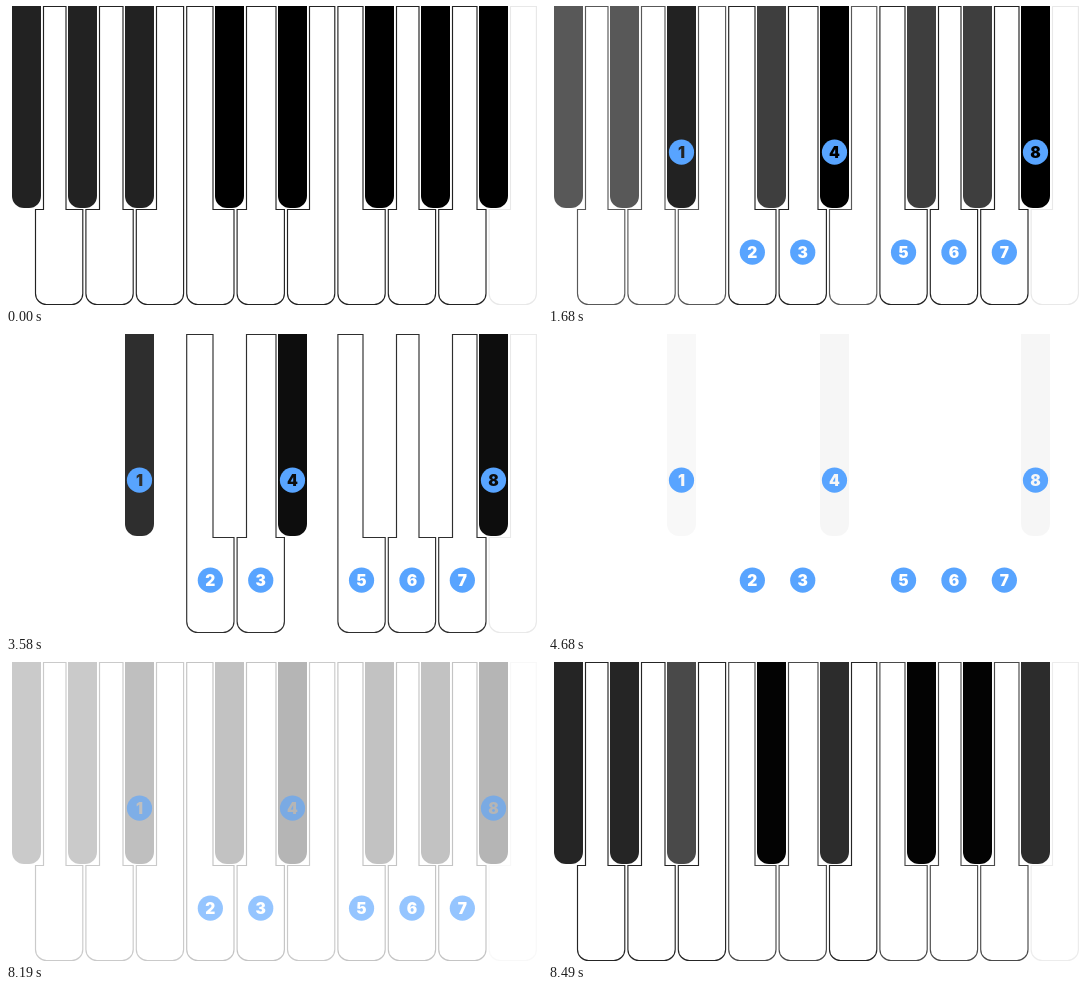
These frames come from a looping animation (536x300 px, 8590 ms). An HTML page:

```html
<!DOCTYPE html>
<html lang="en">
<head>
<meta charset="utf-8">
<title>Piano scale</title>
<style>
  html, body { margin: 0; width: 100%; height: 100%; overflow: hidden; background: #fff; }
  svg { display: block; width: 100vw; height: 100vh; }
  text { font: 900 15.5px Inter, Lato, sans-serif; text-anchor: middle; }
</style>
</head>
<body>
<svg viewBox="0 0 536 300">
  <mask id="digits" maskUnits="userSpaceOnUse" x="0" y="0" width="536" height="300">
    <rect width="536" height="300" fill="#fff"/>
  </mask>
  <g id="whiteOff" fill="#fff" stroke-width="1.15"></g>
  <g id="whiteOn" fill="#fff" stroke-width="1.15"></g>
  <g id="blackOff"></g>
  <g id="blackOn"></g>
  <g id="dots" fill="#58a4ff" mask="url(#digits)"></g>
</svg>
<script>
const LOOP = 8590;
const FAINT = 0.033;
const KEYS = 'bwbwbwwbwbwwbwbwbw';
const BLACK_X = [6, 62, 119, 209, 272, 359, 415, 473];
const BLACK_W = 29;
const WHITE_W = 47.3;

// Major scale, starting on the third black key
const scale = [4];
for (const step of [2, 2, 1, 2, 2, 2, 1]) scale.push(scale.at(-1) + step);

const $ = id => document.getElementById(id);
const add = (id, markup) => $(id).insertAdjacentHTML('beforeend', markup);

function addBlack(n, group) {
  const x = BLACK_X[n];
  add('black' + group,
    `<path fill="${n < 3 ? '#222' : '#000'}" d="M${x} 0h${BLACK_W}v190a12 12 0 0 1-12 12h-5a12 12 0 0 1-12-12Z"/>`);
  return [x + BLACK_W / 2, 146.2];
}

// The upper part is cut back wherever a black key is next to it
function addWhite(n, i, blacks, group, stroke) {
  const left = 29.5 + 50.4 * n;
  const right = left + WHITE_W;
  const a = KEYS[i - 1] === 'b' ? BLACK_X[blacks - 1] + BLACK_W + 2.5 : left;
  const b = KEYS[i + 1] === 'b' ? BLACK_X[blacks] - 2 : right;
  add('white' + group,
    `<path stroke="${stroke}" d="M${a} .5H${b}V203.5H${right}V287.5a11 11 0 0 1-11 11H${left + 11}a11 11 0 0 1-11-11V203.5H${a}Z"/>`);
  return [left + WHITE_W / 2, 246.2];
}

// Digits are holes, so the keys show through them
function addDot([x, y], label) {
  add('dots', `<circle cx="${x}" cy="${y}" r="12.6"/>`);
  add('digits', `<text x="${x}" y="${y + 5.6}">${label}</text>`);
}

let blacks = 0, whites = 0;
[...KEYS].forEach((kind, i) => {
  const degree = scale.indexOf(i) + 1;
  const last = i === KEYS.length - 1;
  const group = degree || last ? 'On' : 'Off';
  const center = kind === 'b'
    ? addBlack(blacks++, group)
    : addWhite(whites++, i, blacks, group, last ? '#e8e8e8' : '#222');
  if (degree) addDot(center, degree);
});

const ramp = (t, from, to) => Math.min(1, Math.max(0, (t - from) / (to - from)));
const smooth = p => p * p * (3 - 2 * p);

function draw(now) {
  const t = now % LOOP;
  const off = 1 - ramp(t, 1430, 2450) + smooth(ramp(t, 8035, 8530));
  const on = 1 - ramp(t, 3530, 4450) + ramp(t, 8050, LOOP);
  $('whiteOff').style.opacity = $('blackOff').style.opacity = off;
  $('whiteOn').style.opacity = on;
  $('blackOn').style.opacity = FAINT + (1 - FAINT) * on;
  $('dots').style.opacity = ramp(t, 630, 980) - ramp(t, 8040, 8445);
}

const start = performance.now();
function tick() {
  draw(performance.now() - start);
  requestAnimationFrame(tick);
}
tick();
</script>
</body>
</html>
```
